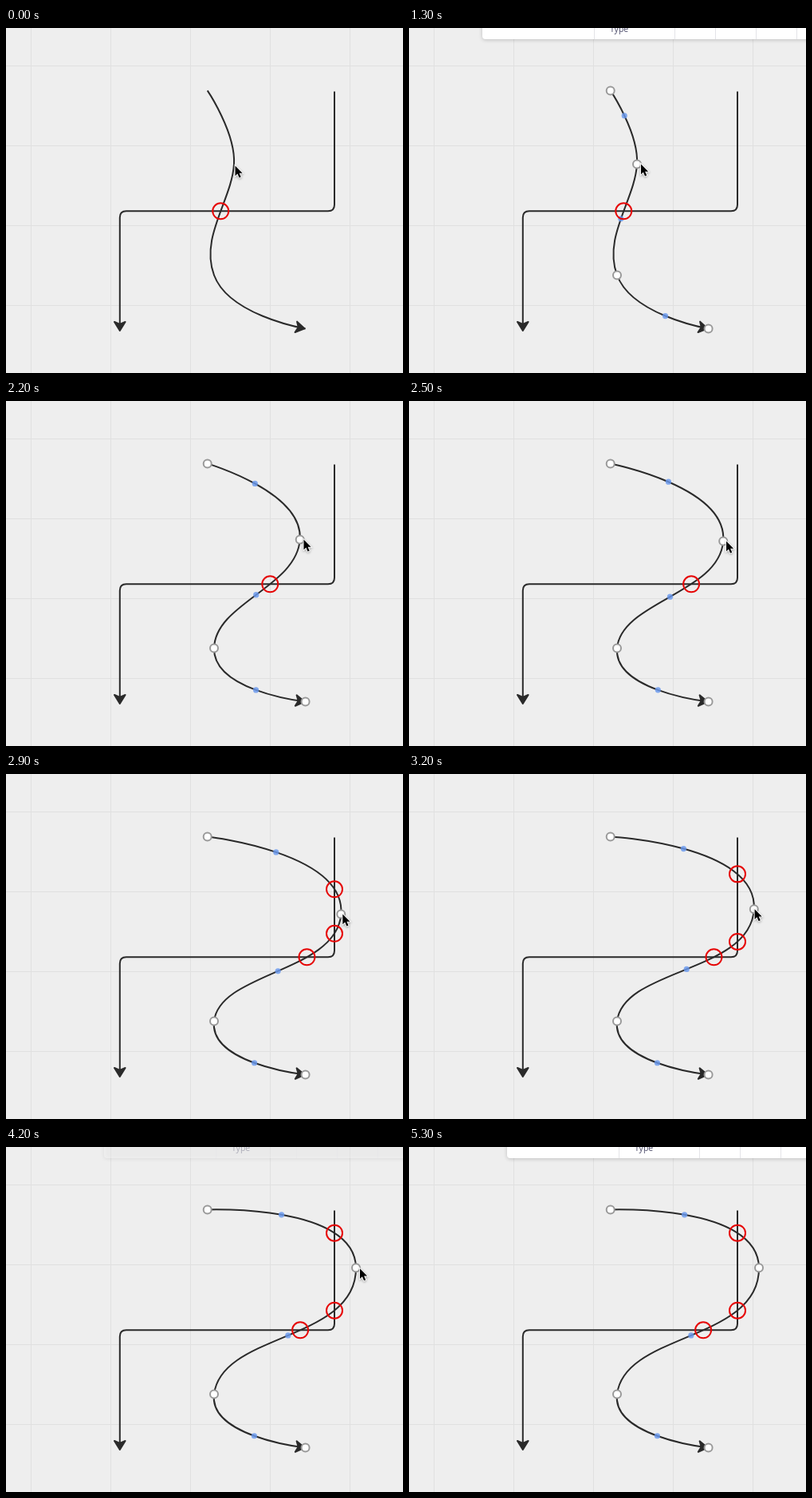
An HTML page with a canvas for the animation above (5.4 s loop, 498 px wide and 432 px high).

```html
<!DOCTYPE html>
<html lang="en">
<head>
<meta charset="utf-8">
<style>
  html, body { margin: 0; width: 100%; height: 100%; overflow: hidden; background: #eee; }
  canvas { display: block; width: 498px; height: 432px; }
</style>
</head>
<body>
<canvas id="stage"></canvas>
<script>
const W = 498, H = 432, LOOP = 5400, STEP = 100;
const INK = '#2a2a2a', RED = '#e60505';
const START = [252.7, 78.4], LOWER = [261, 309.5], END = [375.6, 376.6];
const LEFT = 142.8, RIGHT = 412, MIDDLE = 229.3;

const canvas = document.getElementById('stage');
const ctx = canvas.getContext('2d');
const ratio = window.devicePixelRatio || 1;
canvas.width = W * ratio;
canvas.height = H * ratio;

const linear = (t, from, to) => Math.min(1, Math.max(0, (t - from) / (to - from)));
const smooth = (t, from, to) => { const u = linear(t, from, to); return u * u * (3 - 2 * u); };
const dist = (a, b) => Math.hypot(a[0] - b[0], a[1] - b[1]);
const mix = (a, b, k) => [a[0] + (b[0] - a[0]) * k, a[1] + (b[1] - a[1]) * k];
const push = (p, d, n) => [p[0] + d[0] * n, p[1] + d[1] * n];

// The dragged handle: fast sweep to the right, then up
function bendAt(t) {
  return [
    286 + 153 * Math.sin(linear(t, 1400, 3600) * Math.PI / 2),
    170.5 + 5 * smooth(t, 1800, 2500) - 24.2 * smooth(t, 2900, 3800)
  ];
}

// The pointer holds the handle, lags a little, and leaves at the lower right
function pointerAt(t, bend) {
  const settle = 1 - smooth(t, 200, 400);
  const dx = 5 - 3.5 * settle - 5 * smooth(t, 2000, 3600) + 5 * smooth(t, 3700, 4200);
  const dy = 2 * settle + smooth(t, 3700, 4200);
  return mix([bend[0] + dx, bend[1] + dy], [486, 436], linear(t, 4400, 5000) ** 2);
}

function cubic([a, b, c, d], t) {
  const s = 1 - t;
  return [0, 1].map(i =>
    s * s * s * a[i] + 3 * s * s * t * b[i] + 3 * s * t * t * c[i] + t * t * t * d[i]);
}

// Three Bezier pieces through the four handles
function buildCurve(bend) {
  const l1 = dist(START, bend), l2 = dist(bend, LOWER), l3 = dist(LOWER, END);
  const lean = (154 - bend[1]) * 0.0036;
  const tilt = -0.12 + 0.47 * ((439 - bend[0]) / 153) ** 2;
  const reach = 0.207 + lean / 3;
  const d1 = [lean, 1], d2 = [tilt, Math.sqrt(1 - tilt * tilt)];
  const outLow = push(LOWER, d2, 0.39 * l3);
  return [
    [START, START, push(bend, d1, -0.4 * l1), bend],
    [bend, push(bend, d1, reach * (l1 + l2)), push(LOWER, d2, -reach * (l2 + l3)), LOWER],
    [LOWER, outLow, mix(END, outLow, 0.1), END]
  ];
}

// Where the curve meets the vertical and horizontal parts of the elbow line
function crossings(curve) {
  const hits = [];
  for (const piece of curve) {
    let p = piece[0];
    for (let i = 1; i <= 80; i++) {
      const q = cubic(piece, i / 80);
      [RIGHT, MIDDLE].forEach((line, axis) => {
        if ((p[axis] < line) === (q[axis] < line)) return;
        const hit = mix(p, q, (line - p[axis]) / (q[axis] - p[axis]));
        if (axis ? hit[0] < RIGHT : hit[1] < MIDDLE) hits.push(hit);
      });
      p = q;
    }
  }
  return hits;
}

function disc([x, y], r, fill, stroke) {
  ctx.beginPath();
  ctx.arc(x, y, r, 0, Math.PI * 2);
  if (fill) { ctx.fillStyle = fill; ctx.fill(); }
  if (stroke) { ctx.strokeStyle = stroke; ctx.lineWidth = 2; ctx.stroke(); }
}

function polygon(points) {
  ctx.beginPath();
  points.forEach(([x, y]) => ctx.lineTo(x, y));
  ctx.closePath();
}

function strokeInk() {
  ctx.strokeStyle = INK;
  ctx.lineWidth = 2;
  ctx.stroke();
}

function arrow([x, y], angle) {
  ctx.save();
  ctx.translate(x, y);
  ctx.rotate(angle);
  polygon([[-1, 0], [-12, -6.8], [-9, 0], [-12, 6.8]]);
  ctx.lineJoin = 'round';
  ctx.fillStyle = INK;
  ctx.fill();
  strokeInk();
  ctx.restore();
}

function drawGrid() {
  ctx.fillStyle = '#eee';
  ctx.fillRect(0, 0, W, H);
  ctx.fillStyle = '#e0e0e0';
  for (let x = 31; x < W; x += 100) ctx.fillRect(x, 0, 1, H);
  for (let y = 47; y < H; y += 100) ctx.fillRect(0, y, W, 1);
}

function drawElbow() {
  ctx.beginPath();
  ctx.moveTo(RIGHT, 79.5);
  ctx.lineTo(RIGHT, MIDDLE - 8);
  ctx.quadraticCurveTo(RIGHT, MIDDLE, RIGHT - 8, MIDDLE);
  ctx.lineTo(LEFT + 8, MIDDLE);
  ctx.quadraticCurveTo(LEFT, MIDDLE, LEFT, MIDDLE + 8);
  ctx.lineTo(LEFT, 371);
  strokeInk();
  arrow([LEFT, 380], Math.PI / 2);
}

function drawCurve(curve) {
  ctx.beginPath();
  ctx.moveTo(...START);
  for (const [, b, c, d] of curve) ctx.bezierCurveTo(...b, ...c, ...d);
  strokeInk();
  const c = curve[2][2];
  arrow(END, Math.atan2(END[1] - c[1], END[0] - c[0]));
}

function drawBar(left, alpha) {
  ctx.save();
  ctx.globalAlpha = alpha;
  ctx.shadowColor = 'rgba(0,0,0,0.2)';
  ctx.shadowBlur = 5 * ratio;
  ctx.shadowOffsetY = ratio;
  ctx.fillStyle = '#fff';
  ctx.beginPath();
  ctx.roundRect(left, -40, 500, 54, 4);
  ctx.fill();
  ctx.shadowColor = 'transparent';
  ctx.fillStyle = '#e4e4e8';
  ctx.fillRect(left + 140, 0, 1, 14);
  for (let x = left + 241; x < W; x += 51) ctx.fillRect(x, 0, 1, 14);
  ctx.fillStyle = '#4a4a68';
  ctx.font = '10.5px "Open Sans", sans-serif';
  ctx.fillText('Type', left + 160, 5);
  ctx.restore();
}

function drawPointer([x, y]) {
  ctx.save();
  ctx.translate(x, y);
  ctx.scale(0.88, 0.88);
  polygon([[0, 0], [0, 14.5], [3.3, 11.4], [5.7, 17], [8.2, 16], [5.8, 10.5], [10.4, 10.5]]);
  ctx.shadowColor = 'rgba(0,0,0,0.35)';
  ctx.shadowBlur = 3 * ratio;
  ctx.shadowOffsetY = ratio;
  ctx.strokeStyle = '#fff';
  ctx.lineWidth = 2;
  ctx.stroke();
  ctx.shadowColor = 'transparent';
  ctx.fillStyle = '#000';
  ctx.fill();
  ctx.restore();
}

function draw(t) {
  const bend = bendAt(t);
  const curve = buildCurve(bend);
  ctx.setTransform(ratio, 0, 0, ratio, 0, 0);
  drawGrid();
  drawElbow();
  drawCurve(curve);
  if (t >= 400) {
    for (const piece of curve) disc(cubic(piece, 0.5), 3.6, 'rgba(105,152,238,0.82)');
    for (const p of [START, bend, LOWER, END]) disc(p, 5, '#fff', '#999');
  }
  for (const p of crossings(curve)) disc(p, 10, null, RED);
  if (t >= 600 && t < 1400) drawBar(92, t < 700 ? 0.5 : 1);
  if (t >= 4200) drawBar(123, t < 4500 ? 0.4 : 1);
  if (t < 5000) drawPointer(pointerAt(t, bend));
}

function tick(now) {
  draw(Math.floor((now % LOOP) / STEP) * STEP);
  requestAnimationFrame(tick);
}
draw(0);
requestAnimationFrame(tick);
</script>
</body>
</html>
```
